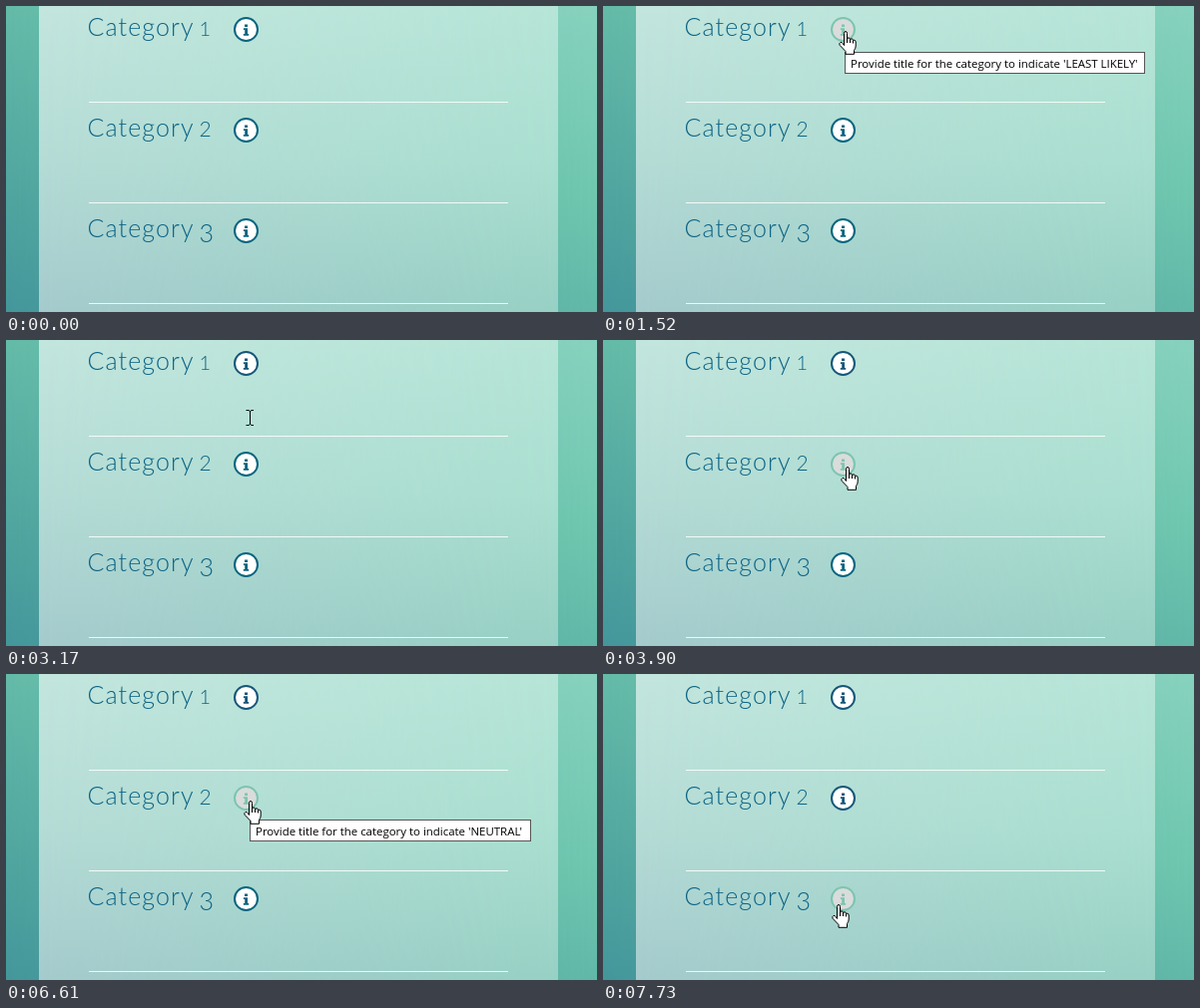
Animation, 592 px wide and 307 px high, one loop 8000 ms. Source, as an HTML page:

```html
<!DOCTYPE html>
<html lang="en">
<head>
<meta charset="utf-8">
<title>Category tooltips</title>
<style>
  html, body { margin: 0; width: 100%; height: 100%; overflow: hidden; }
  body { position: relative; }
  .layer { position: absolute; inset: 0; }
  .right { -webkit-mask-image: linear-gradient(to right, transparent, #000); mask-image: linear-gradient(to right, transparent, #000); }
  .panel { position: absolute; left: 33px; top: 0; width: 520px; height: 307px; }
  .back .left { background: linear-gradient(#64bba8, #54a9a1 50%, #44979b); }
  .back .right { background: linear-gradient(#87d2be, #6fc7af 62%, #62b8a8); }
  .panel .left { background: linear-gradient(#c3e6de, #b5dcd6 50%, #a5cbcd); }
  .panel .right { background: linear-gradient(#b6e5d7, #aadfd0 50%, #97d0c4); }
  svg { position: absolute; left: 0; top: 0; }
  .label { font: 300 25px Lato, sans-serif; letter-spacing: 1.1px; fill: #0b6385; }
  .digit { letter-spacing: 0; }
  .icon { --ink: #07647f; --face: #fff; }
  .icon.seen { --ink: #15567a; }
  .icon.hover { --ink: #7cc5b0; --face: #d9dcdb; }
  .icon circle { fill: var(--face); stroke: var(--ink); stroke-width: 2; }
  .icon path { fill: var(--ink); }
  .tip rect { fill: #fff; stroke: #555; }
  .tip text { font: 11.45px "Open Sans", sans-serif; }
  .pointer path { fill: #fff; stroke: #000; stroke-linejoin: round; }
  .pointer .line { fill: none; }
</style>
</head>
<body>
<div class="layer back"><div class="layer left"></div><div class="layer right"></div></div>
<div class="panel"><div class="layer left"></div><div class="layer right"></div></div>
<svg width="592" height="307" viewBox="0 0 592 307">
  <g id="rows"></g>
  <g id="tips"></g>
  <g class="pointer" id="arrow"><path d="M.5 .5V16.5L4.2 13L6.7 18.8L9.1 17.8L6.7 12.2H11.8Z"/></g>
  <g class="pointer" id="beam"><path class="line" d="M-3.5 -7.5H-1L.5 -6.5L2 -7.5H4M.5 -6.5V6.5M-3.5 7.5H-1L.5 6.5L2 7.5H4"/></g>
  <g class="pointer" id="hand"><g transform="translate(-6 0)">
    <path d="M5.5 14.5V2.5Q5.5 .5 7 .5T8.5 2.5V8Q8.7 6.9 10 6.9T11.5 8.4V9Q11.7 7.8 13 7.8T14.5 9.5V10.2Q14.7 9.2 15.8 9.2T17.2 11V15Q17.2 17.4 15.5 19.5V23.3H7V20.5L1.2 14.4Q.2 12.4 1.8 11.6T4 12.6Z"/>
    <path class="line" d="M8.5 8V12M11.5 9V12M14.5 10V12.5"/>
  </g></g>
</svg>
<script>
const LOOP = 8000, STEP = 66.4, PITCH = 101;
const byId = id => document.getElementById(id);

// Old-style figures: [font size, drop below the baseline]
const digits = [[20, 0], [21, 0], [25, 5]];

byId('rows').innerHTML = digits.map(([size, drop], i) => `
  <g transform="translate(0 ${i * PITCH})">
    <text class="label" x="81.5" y="30">Category</text>
    <text class="label digit" x="193.5" y="${30 + drop}" style="font-size:${size}px">${i + 1}</text>
    <rect x="83" y="96" width="420" height="1" fill="#fff" opacity=".85"/>
    <g class="icon" transform="translate(240.5 23.5)">
      <circle r="11.5"/>
      <path d="M-1.5 -5H1.5V-2.4H-1.5ZM-2.6 -1.2H1.5V4.6H2.7V6.3H-2.7V4.6H-1.3V.5H-2.6Z"/>
    </g>
  </g>`).join('');

const tips = [
  { from: 1520, to: 2710, x: 242, y: 46, width: 301, word: 'LEAST LIKELY' },
  { from: 4550, to: 6665, x: 244, y: 146, width: 282, word: 'NEUTRAL' }
];
byId('tips').innerHTML = tips.map(tip => `
  <g class="tip" transform="translate(${tip.x} ${tip.y})">
    <rect x=".5" y=".5" width="${tip.width - 1}" height="21"/>
    <text x="6" y="16">Provide title for the category to indicate '${tip.word}'</text>
  </g>`).join('');

// Each move: start time, then points [offset, x, y] of the hotspot
const moves = [
  [270, [[0, 493, 279], [130, 405, 190], [260, 325, 110], [400, 265, 55], [530, 245, 36], [725, 242, 25]]],
  [2710, [[0, 242, 27], [200, 243, 42], [460, 244, 77], [660, 244, 118], [790, 244, 128]]],
  [3900, [[0, 244, 127], [130, 244, 125]]],
  [6610, [[0, 244, 127], [60, 243, 133], [200, 240, 180], [330, 235, 225], [390, 234, 232]]],
  [7200, [[0, 235, 232]]],
  [7730, [[0, 235, 231]]]
];

function pointerAt(time) {
  const move = moves.filter(([start]) => time >= start).pop();
  if (!move) return null;
  const [start, points] = move;
  const offset = Math.floor((time - start + 5) / STEP) * STEP;
  const next = points.findIndex(p => p[0] > offset);
  if (next < 0) return points[points.length - 1].slice(1);
  const a = points[next - 1], b = points[next];
  const part = (offset - a[0]) / (b[0] - a[0]);
  return [1, 2].map(k => Math.round(a[k] + (b[k] - a[k]) * part));
}

const icons = [...document.querySelectorAll('.icon')];
const tipNodes = [...document.querySelectorAll('.tip')];
const pointers = ['arrow', 'beam', 'hand'].map(byId);
const leaveTimes = [2710, 6610, Infinity];

function draw(time) {
  const pos = pointerAt(time);
  const [x, y] = pos || [-100, -100];
  const hovered = icons.findIndex((_, i) => Math.hypot(x - 240.5, y - 23.5 - i * PITCH) < 12.5);
  const inField = x > 83 && x < 503 && y % PITCH > 50 && y % PITCH < 96;
  const shape = hovered >= 0 ? 'hand' : inField ? 'beam' : 'arrow';

  icons.forEach((icon, i) => {
    icon.classList.toggle('hover', i === hovered);
    icon.classList.toggle('seen', time > leaveTimes[i]);
  });
  pointers.forEach(node => {
    node.style.display = pos && node.id === shape ? '' : 'none';
    node.setAttribute('transform', `translate(${x} ${y})`);
  });
  tips.forEach((tip, i) => {
    tipNodes[i].style.display = time >= tip.from && time < tip.to ? '' : 'none';
  });
}

const begin = performance.now();
function tick() {
  draw((performance.now() - begin) % LOOP);
  requestAnimationFrame(tick);
}
tick();
</script>
</body>
</html>
```
